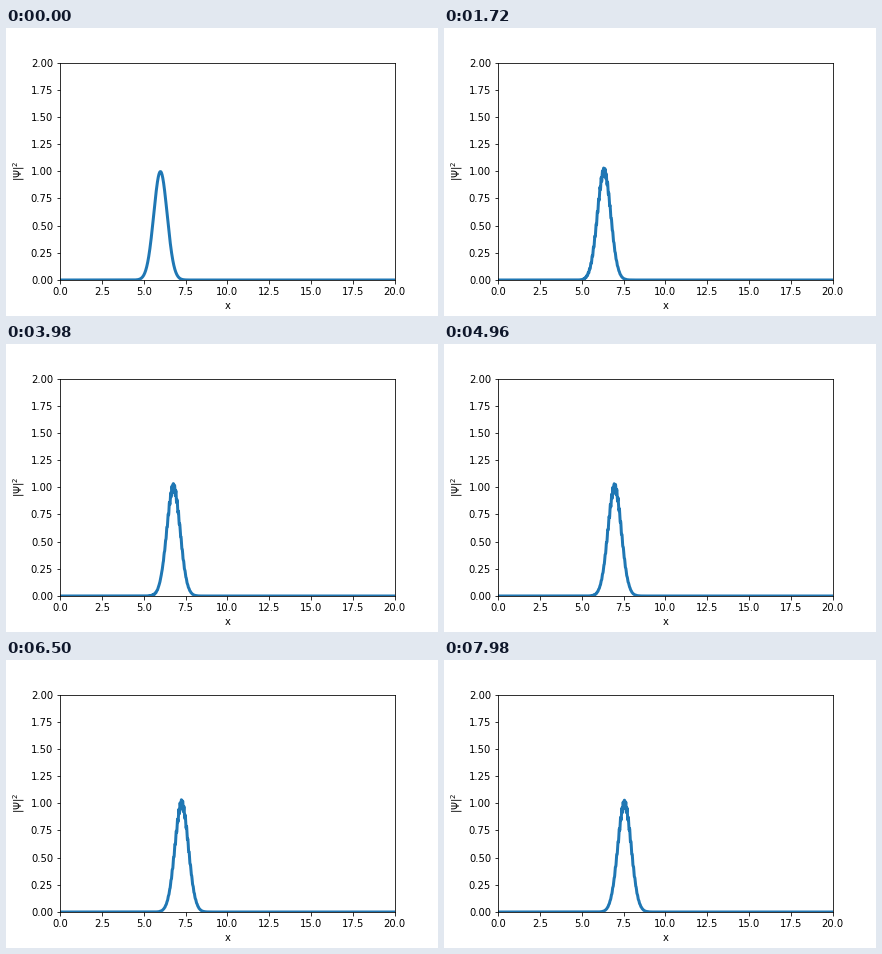
These frames come from a looping animation (432x288 px, 8 s). A matplotlib script:

```python
import numpy as np
import matplotlib.pyplot as plt
from matplotlib.animation import FuncAnimation

FRAMES, INTERVAL = 400, 20
LENGTH, POINTS = 20.0, 2001
X0, SIGMA, K0 = 6.0, 0.4, 40.0

x = np.linspace(0, LENGTH, POINTS)
dx = x[1] - x[0]
dt = 1e-4


def hamiltonian(f):
    """Free-particle energy operator with fixed ends."""
    out = np.zeros_like(f)
    out[1:-1] = -0.5 * (f[2:] - 2 * f[1:-1] + f[:-2]) / dx**2
    return out


def evolve(steps):
    """Probability density of a moving Gaussian packet, one row per step."""
    envelope = np.exp(-((x - X0) / (2 * SIGMA)) ** 2)
    envelope /= np.sqrt(np.sum(envelope**2) * dx)
    re = envelope * np.cos(K0 * (x - X0))
    im = envelope * np.sin(K0 * (x - X0))
    rows = []
    for _ in range(steps):
        rows.append(re**2 + im**2)
        re = re + dt * hamiltonian(im)
        im = im - dt * hamiltonian(re)
    return rows


density = evolve(FRAMES)

fig = plt.figure(figsize=(6, 4), dpi=72, facecolor="white")
fig.subplots_adjust(left=0.125, right=0.9, bottom=0.125, top=0.88)
ax = fig.add_subplot(xlim=(0, LENGTH), ylim=(0, 2))
ax.set_xlabel("x")
ax.set_ylabel(r"$|\Psi|^2$")
line, = ax.plot(x, density[0], lw=3, color="#1f77b4")


def update(i):
    line.set_ydata(density[i])
    return line,


anim = FuncAnimation(fig, update, frames=FRAMES, interval=INTERVAL,
                     repeat=True, repeat_delay=0, blit=False)
plt.show()
```
